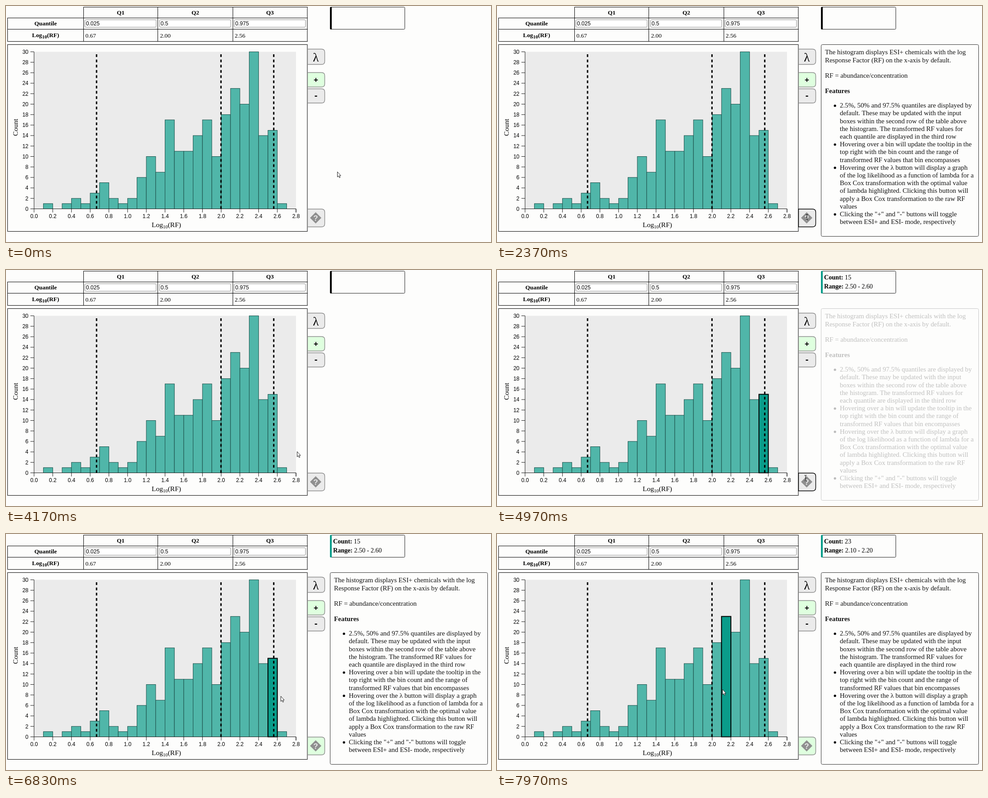
Write an HTML page that moves like this. It is 1072 px wide and 523 px high and loops after 8 s.

```html
<!DOCTYPE html>
<html lang="en">
<head>
<meta charset="utf-8">
<title>Response factor histogram</title>
<style>
  html, body { margin: 0; width: 100%; height: 100%; overflow: hidden; background: #fdfdfc; }
  svg { display: block; }
  text { font-family: "Liberation Serif", "Times New Roman", serif; fill: #000; }
  .sans { font-family: "Liberation Sans", Arial, sans-serif; font-size: 12px; }
  .b { font-weight: bold; }
  .mid { text-anchor: middle; }
  .table { font-size: 13.33px; }
  .tip { font-size: 14.1px; }
  .info { font-size: 14.88px; fill: #111; }
  .label { font-size: 15.5px; }
  .line { fill: none; stroke: #000; }
  .axis { fill: none; stroke: #1a1a1a; }
  .input { fill: #fff; stroke: #858585; }
  .btn { fill: #ebebeb; stroke: #8c8c8c; stroke-width: 1.4; }
  .bar { fill: #50b6a9; stroke: #1b4f49; }
  .dash { stroke: #000; stroke-width: 3; stroke-dasharray: 6 5.6; }
</style>
</head>
<body>
<svg id="stage" width="1072" height="523" viewBox="0 0 1072 523"></svg>
<script>
const LOOP = 8000;
const TEAL = '#0a9c8a', GREEN = '#dfffdf', GREY = '#ebebeb';
const counts = [0, 1, 0, 1, 2, 1, 3, 5, 2, 1, 2, 6, 10, 7, 17, 11, 11, 14, 17, 10, 18, 23, 20, 30, 14, 15, 1];
const px = v => 62 + v * 206.8;
const py = n => 449.5 - n * 11.6;

// time, x, y of the pointer
const path = [
  [0, 732, 367], [300, 728, 375], [800, 686, 462], [1100, 685, 468], [3150, 685, 468],
  [3400, 672, 441], [3800, 650, 412], [4170, 643, 402], [4480, 591, 378], [4600, 590, 377],
  [4880, 672, 452], [5050, 691, 468], [6050, 692, 469], [6250, 682, 456], [6500, 640, 398],
  [6830, 607, 359], [7970, 498, 344]
];
// time, opacity of the help panel
const fade = [[0, 0], [780, 0], [1080, 1], [3230, 1], [3530, 0], [4900, 0], [5180, 1]];
const PIN = 5900;

function at(track, t, k) {
  const i = track.findIndex(s => s[0] > t);
  if (i < 0) return track[track.length - 1][k];
  const a = track[i - 1], b = track[i];
  return a[k] + (b[k] - a[k]) * (t - a[0]) / (b[0] - a[0]);
}

const text = (x, y, cls, s, extra = '') => `<text x="${x}" y="${y}" class="${cls}" ${extra}>${s}</text>`;
const rect = (x, y, w, h, cls, extra = '') =>
  `<rect x="${x}" y="${y}" width="${w}" height="${h}" class="${cls}" ${extra}/>`;
const log10 = (sub, drop) =>
  `Log<tspan font-size="${sub}" dy="${drop}">10</tspan><tspan dy="${-drop}">(RF)</tspan>`;

function table() {
  let s = '<path class="line" d="M171 2.5H666.5M3 26.5H666.5M3 51.5H666.5M3 78.5H666.5' +
    'M3.5 26V79M171.5 2V79M335.5 2V79M501.5 2V79M666 2V79"/>';
  s += text(87.5, 43, 'table b mid', 'Quantile') + text(87.5, 69, 'table b mid', log10(11, 3));
  [['0.025', '0.67'], ['0.5', '2.00'], ['0.975', '2.56']].forEach(([q, v], i) => {
    const x = 171 + i * 165;
    s += text(x + 82.5, 19, 'table b mid', 'Q' + (i + 1));
    s += rect(x + 3.5, 30.5, 157.5, 16.5, 'input', 'rx="2"');
    s += text(x + 5.8, 42.7, 'sans', q) + text(x + 4.5, 70, 'table', v);
  });
  return s;
}

function chart() {
  let s = rect(3.5, 85.5, 662.5, 414, 'line') + rect(62, 101.5, 579, 348, '', `fill="${GREY}"`);
  counts.forEach((n, i) => { if (n) s += rect(px(i / 10), py(n), 20.68, n * 11.6, 'bar'); });
  s += rect(0, 0, 20.68, 0, '', `id="hot" fill="${TEAL}" stroke="#000" stroke-width="2"`);
  let d = 'M54 101.5H62V449.5H641V457.5';
  for (let n = 0; n <= 30; n += 2) {
    d += `M54 ${py(n)}H62`;
    s += text(49.5, py(n) + 4.3, 'sans', n, 'text-anchor="end"');
  }
  for (let i = 0; i <= 14; i++) {
    const x = px(i / 5);
    d += `M${x} 449.5V457.5`;
    s += text(x, 470, 'sans mid', (i / 5).toFixed(1));
  }
  s += `<path class="axis" d="${d}"/>`;
  [0.668, 1.998, 2.562].forEach(v => {
    s += `<line class="dash" x1="${px(v)}" x2="${px(v)}" y1="449.5" y2="101.5"/>`;
  });
  s += text(354.5, 490, 'label mid', log10(10.7, 3));
  return s + text(0, 0, 'label mid', 'Count', 'transform="translate(26 269) rotate(-90)"');
}

const button = (y, h, extra = '') =>
  `<path class="btn" d="M666.5 ${y}h31q7 0 7 7v${h - 14}q0 7 -7 7h-31z" ${extra}/>`;

function buttons() {
  return button(95.5, 34) + text(684.7, 122.5, 'mid', 'λ', 'font-size="27"') +
    button(147.5, 32, `style="fill:${GREEN}"`) +
    text(685, 168.5, 'sans b mid', '+', 'style="font-size:17px"') +
    button(183.5, 31.5) + text(685, 205, 'sans b mid', '-', 'style="font-size:20px"') +
    button(450, 39.5, 'id="help"') +
    '<path fill="#8f8f8f" d="M684.5 457L697 469.5L684.5 482L672 469.5Z"/>' +
    text(684.5, 475.5, 'sans b mid', '?', `style="font-size:17px;fill:${GREY}"`);
}

function tooltip() {
  return rect(716.5, 2.5, 165, 49, '', 'rx="2" fill="#fdfdfc" stroke="#222"') +
    '<path id="edge" d="M720 2H718.5Q716 2 716 4.5V49.5Q716 52 718.5 52H720Z"/>' +
    '<g id="tip">' +
    text(723, 20.5, 'tip', '<tspan class="b">Count:</tspan> <tspan id="count"></tspan>') +
    text(723, 41, 'tip', '<tspan class="b">Range:</tspan> <tspan id="range"></tspan>') + '</g>';
}

function panel() {
  const items = [
    ['2.5%, 50% and 97.5% quantiles are displayed by', 'default. These may be updated with the input',
      'boxes within the second row of the table above', 'the histogram. The transformed RF values for',
      'each quantile are displayed in the third row'],
    ['Hovering over a bin will update the tooltip in the', 'top right with the bin count and the range of',
      'transformed RF values that bin encompasses'],
    ['Hovering over the λ button will display a graph', 'of the log likelihood as a function of lambda for a',
      'Box Cox transformation with the optimal value', 'of lambda highlighted. Clicking this button will',
      'apply a Box Cox transformation to the raw RF', 'values'],
    ['Clicking the "+" and "-" buttons will toggle', 'between ESI+ and ESI- mode, respectively']
  ];
  let s = rect(716.5, 85.5, 348, 425, '', 'rx="3" fill="#fdfdfc" stroke="#333"');
  s += text(725, 107.3, 'info', 'The histogram displays ESI+ chemicals with the log');
  s += text(725, 124.5, 'info', 'Response Factor (RF) on the x-axis by default.');
  s += text(725, 159, 'info', 'RF = abundance/concentration');
  s += text(725, 193.3, 'info b', 'Features');
  let y = 225.2;
  for (const lines of items) {
    s += `<circle cx="747" cy="${y - 4.2}" r="2.6"/>`;
    for (const line of lines) {
      s += text(757.8, y, 'info', line);
      y += 17.2;
    }
  }
  return `<g id="panel">${s}</g>`;
}

const pointer =
  '<path id="arrow" fill="#fff" stroke="#222" stroke-width="1" stroke-linejoin="round" ' +
  'd="M.5 .5V12L3 9.6L4.9 13.7L6.7 12.9L4.9 9H8.2Z"/>' +
  '<path id="beam" class="line" stroke-width="1" d="M-2.5 -6H-.7L0 -5.4L.7 -6H2.5M0 -5.4V5.4M-2.5 6H-.7L0 5.4L.7 6H2.5"/>';

const $ = id => document.getElementById(id);
$('stage').innerHTML = table() + chart() + buttons() + tooltip() + panel() + pointer;

function binAt(t) {
  const x = at(path, t, 1), y = at(path, t, 2);
  const i = Math.floor((x - 62) / 20.68);
  return counts[i] && y > py(counts[i]) && y < 449 ? i : -1;
}

// The last bin touched stays lit, so look back along the path.
function litBin(t) {
  for (; t > 0; t -= 10) {
    const i = binAt(t);
    if (i >= 0) return i;
  }
  return -1;
}

function draw(t) {
  const x = at(path, t, 1), y = at(path, t, 2);
  const over = x > 666 && x < 705 && y > 449 && y < 490;
  const onText = over && Math.abs(x - 684.5) < 13 && Math.abs(y - 469.5) < 13;
  for (const [id, on] of [['arrow', !onText], ['beam', onText]]) {
    $(id).style.display = on ? '' : 'none';
    $(id).setAttribute('transform', `translate(${Math.round(x)} ${Math.round(y)})`);
  }
  $('help').style.stroke = over ? '#000' : '';
  $('help').style.fill = t >= PIN ? GREEN : '';
  $('panel').style.opacity = at(fade, t, 1);

  const bin = litBin(t), lit = bin >= 0;
  $('hot').style.display = $('tip').style.display = lit ? '' : 'none';
  $('edge').style.fill = lit ? TEAL : '#000';
  if (!lit) return;
  $('hot').setAttribute('x', px(bin / 10));
  $('hot').setAttribute('y', py(counts[bin]));
  $('hot').setAttribute('height', counts[bin] * 11.6);
  $('count').textContent = counts[bin];
  $('range').textContent = `${(bin / 10).toFixed(2)} - ${((bin + 1) / 10).toFixed(2)}`;
}

const start = performance.now();
function tick() {
  draw((performance.now() - start) % LOOP);
  requestAnimationFrame(tick);
}
tick();
</script>
</body>
</html>
```
